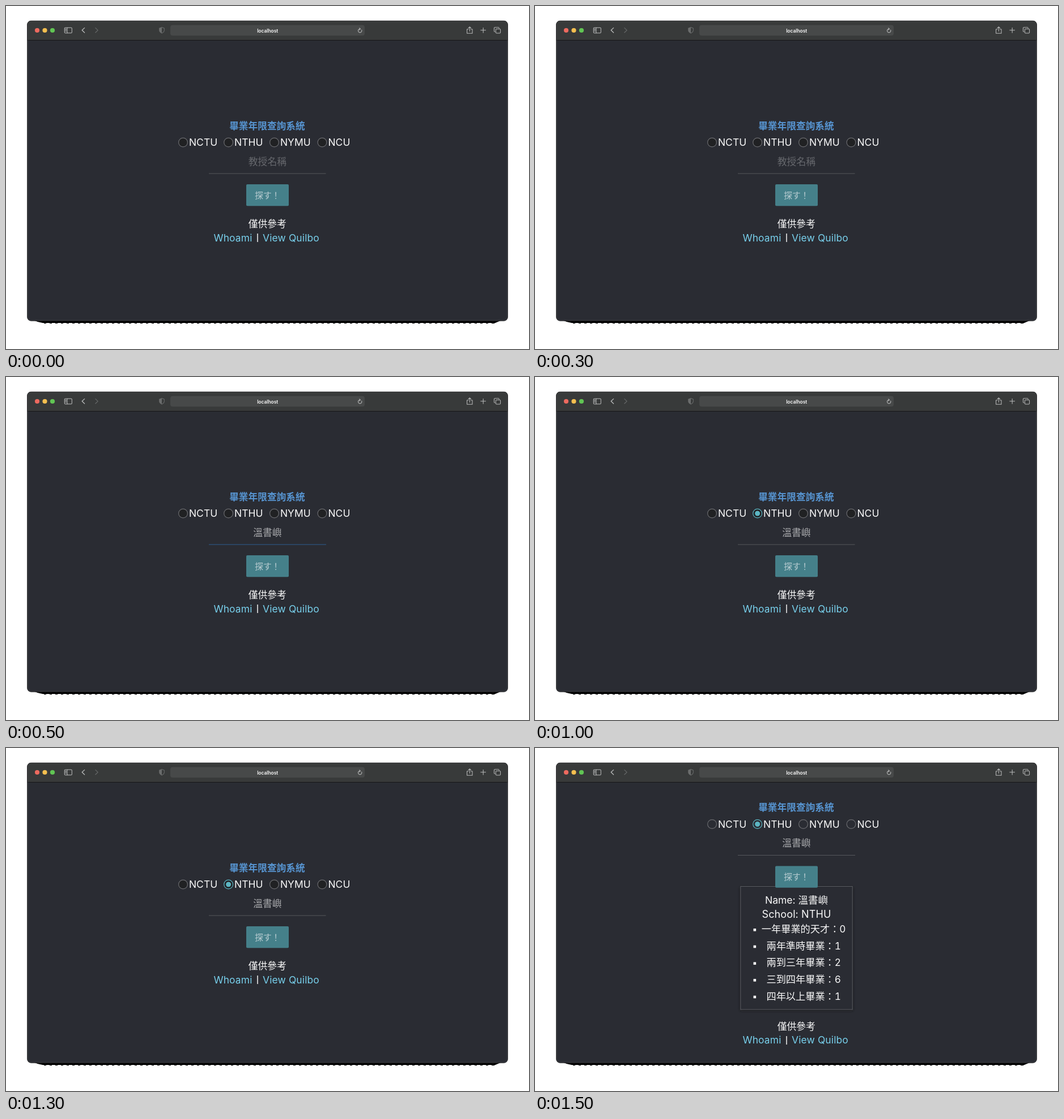
An HTML page that plays this animation: 923 px wide and 606 px high, repeating every 2 s.

```html
<!DOCTYPE html>
<html lang="zh-Hant">
<head>
<meta charset="utf-8">
<title>Graduation lookup</title>
<style>
html, body { margin: 0; width: 100%; height: 100%; overflow: hidden; background: #fff; }
svg { display: block; width: 923px; height: 606px; }
text { font: 400 17.2px Inter, 'Noto Sans CJK TC', 'Noto Sans CJK', sans-serif; fill: #fafafa; }
.mid { text-anchor: middle; }
.latin { font-size: 17.4px; letter-spacing: .1px; }
.link { fill: #78d0ec; letter-spacing: .15px; }
.row { font-variant-numeric: tabular-nums; }
.icon { fill: none; stroke: #b9baba; stroke-width: 1.05; stroke-linecap: round; stroke-linejoin: round; }
.dim { stroke: #6a6c6c; }
</style>
</head>
<body>
<svg viewBox="0 0 923 606">
  <defs>
    <clipPath id="frame"><rect x="37.3" y="25.9" width="848.4" height="530.6" rx="7"/></clipPath>
    <filter id="soft" x="-10%" y="-10%" width="120%" height="120%"><feGaussianBlur stdDeviation="2.5"/></filter>
  </defs>
  <path id="shade"/>
  <g clip-path="url(#frame)">
    <rect x="37" y="25" width="849" height="532" fill="#2a2c33"/>
    <rect x="37" y="25" width="849" height="35" fill="#383a3a"/>
    <rect x="37" y="60" width="849" height="1" fill="#151617"/>
  </g>
  <rect x="38.4" y="27" width="846.2" height="528.4" rx="6" fill="none" stroke="#5d5f61" stroke-opacity=".6" stroke-width=".9"/>
  <rect x="37.7" y="26.3" width="847.6" height="529.8" rx="6.8" fill="none" stroke="#18191a" stroke-width=".8"/>

  <circle cx="55" cy="43" r="4.1" fill="#ed6a5f"/>
  <circle cx="68.5" cy="43" r="4.1" fill="#f5bf4f"/>
  <circle cx="82" cy="43" r="4.1" fill="#61c554"/>
  <rect x="290" y="33.8" width="343" height="18.4" rx="4" fill="#474949"/>
  <text class="mid" x="461.7" y="46.5" style="font-size:8.4px;font-weight:600">localhost</text>
  <g class="icon">
    <rect x="103.3" y="38.3" width="13" height="9.4" rx="1.5"/>
    <path d="M108 38.3v9.4M104.9 40.6h1.5M104.9 42.5h1.5M104.9 44.4h1.5"/>
    <path d="M138.6 38.6l-4.4 4.2 4.4 4.2" stroke-width="1.3"/>
    <path class="dim" d="M157.8 38.6l4.4 4.2-4.4 4.2"/>
    <path class="dim" d="M275 37.8l4.3 1.5v3.8q0 3-4.3 5-4.3-2-4.3-5v-3.8z"/>
    <path d="M275 37.8v10.3q-4.3-2-4.3-5v-3.8z" fill="#6a6c6c" stroke="none"/>
    <path d="M627.6 42.3a3.2 3.2 0 1 1-2.6-1.8M623.8 38.8l1.7 1.7-1.7 1.7"/>
    <path d="M816 41h-2.4v7.2h9.4V41h-2.4M818.3 44.6v-7.8M816 39l2.3-2.2 2.3 2.2"/>
    <path d="M837.8 42.8h8.8M842.2 38.4v8.8"/>
    <rect x="864.4" y="40.4" width="8.2" height="7.6" rx="1.4"/>
    <path d="M862.8 45.6q-1.3 0-1.3-1.3v-5.2q0-1.4 1.4-1.4h6q1.3 0 1.3 1.2"/>
  </g>

  <g id="result">
    <rect x="362.5" y="246" width="198" height="218" fill="#17181c" fill-opacity=".8" filter="url(#soft)"/>
    <rect x="362.8" y="244.5" width="197.4" height="217.5" fill="#2a2c33" stroke="#5b5d62"/>
    <text id="who" class="mid" x="461.5" y="275.2" style="font-size:17.5px"></text>
    <text class="mid" x="461.5" y="300.3" style="font-size:18px;letter-spacing:.1px">School: NTHU</text>
    <g id="list"></g>
  </g>

  <g id="form">
    <text class="mid" x="460.9" y="217.5" style="font-size:16.7px;font-weight:700;fill:#5795d2">畢業年限查詢系統</text>
    <g id="schools"></g>
    <text id="field" class="mid" x="461.4" y="280.8" style="font-size:16.8px"></text>
    <rect id="line" x="358" y="295.5" height="1"/>
    <rect x="424" y="315" width="75" height="38.2" rx="2" fill="#45808a"/>
    <text class="mid" lang="ja" x="461.3" y="339.6" style="font-size:14.7px;font-family:'Noto Sans CJK JP','Noto Sans CJK',sans-serif;fill:#b9cdd2">探す！</text>
  </g>

  <g id="foot">
    <text class="mid" x="461.3" y="391" style="font-size:16.8px">僅供參考</text>
    <text class="latin link" x="366.4" y="415.8">Whoami</text>
    <text class="mid" x="444" y="414" style="font-size:12.5px;font-weight:600">|</text>
    <text class="latin link" x="453" y="415.8">View Quilbo</text>
  </g>
</svg>
<script>
const $ = id => document.getElementById(id);
const person = '溫書嶼';
const shift = 106.5;

$('schools').innerHTML = [['NCTU', 312.5], ['NTHU', 392.6], ['NYMU', 473.5], ['NCU', 558]].map(([name, x]) =>
  `<circle class="ring" cx="${x}" cy="241" r="7.9" stroke-width="1.2"/>
   <circle class="dot" cx="${x}" cy="241" r="4.5" fill="#5cb6c3"/>
   <text class="latin" x="${x + 10.4}" y="247.4">${name}</text>`).join('');

$('list').innerHTML = ['一年畢業的天才：0', '兩年準時畢業：1', '兩到三年畢業：2', '三到四年畢業：6', '四年以上畢業：1'].map((row, i) => {
  const y = 326 + i * 29.65;
  return `<rect x="385.5" y="${y - 7}" width="4.6" height="4.6" fill="#fafafa"/>
    <text class="mid row" x="474.2" y="${y}">${row}</text>`;
}).join('');
$('who').textContent = 'Name: ' + person;

// Ragged lower edge of the window shadow
let edge = 'M48 555L56 558L65 560';
for (let x = 65; x < 860; x += 2) edge += `L${x} ${x * 7 % 5 > 2 ? 561 : 560}h2`;
$('shade').setAttribute('d', edge + 'L868 558L875 555Z');

const rings = document.querySelectorAll('.ring');
const dots = document.querySelectorAll('.dot');
let last = -1;

function draw(ms) {
  const step = Math.floor(ms % 2000 / 500);
  if (step === last) return;
  last = step;
  const typed = step > 0, done = step === 3;
  $('field').textContent = typed ? person : '教授名稱';
  $('field').style.fill = typed ? '#a9aaad' : '#66686d';
  $('line').setAttribute('fill', step === 1 ? '#2c5f92' : '#56585d');
  $('line').setAttribute('width', step % 2 ? 207 : 206.5);
  rings.forEach((ring, i) => {
    const on = step > 1 && i === 1;
    ring.setAttribute('fill', done ? '#2a2c33' : '#202123');
    ring.setAttribute('stroke', on ? '#5cb6c3' : '#6a6b6f');
    dots[i].setAttribute('visibility', on ? 'visible' : 'hidden');
  });
  $('result').setAttribute('visibility', done ? 'visible' : 'hidden');
  $('form').setAttribute('transform', `translate(0 ${done ? -shift : 0})`);
  $('foot').setAttribute('transform', `translate(0 ${done ? shift : 0})`);
}

const start = performance.now();
function tick() {
  draw(performance.now() - start);
  requestAnimationFrame(tick);
}
tick();
</script>
</body>
</html>
```
